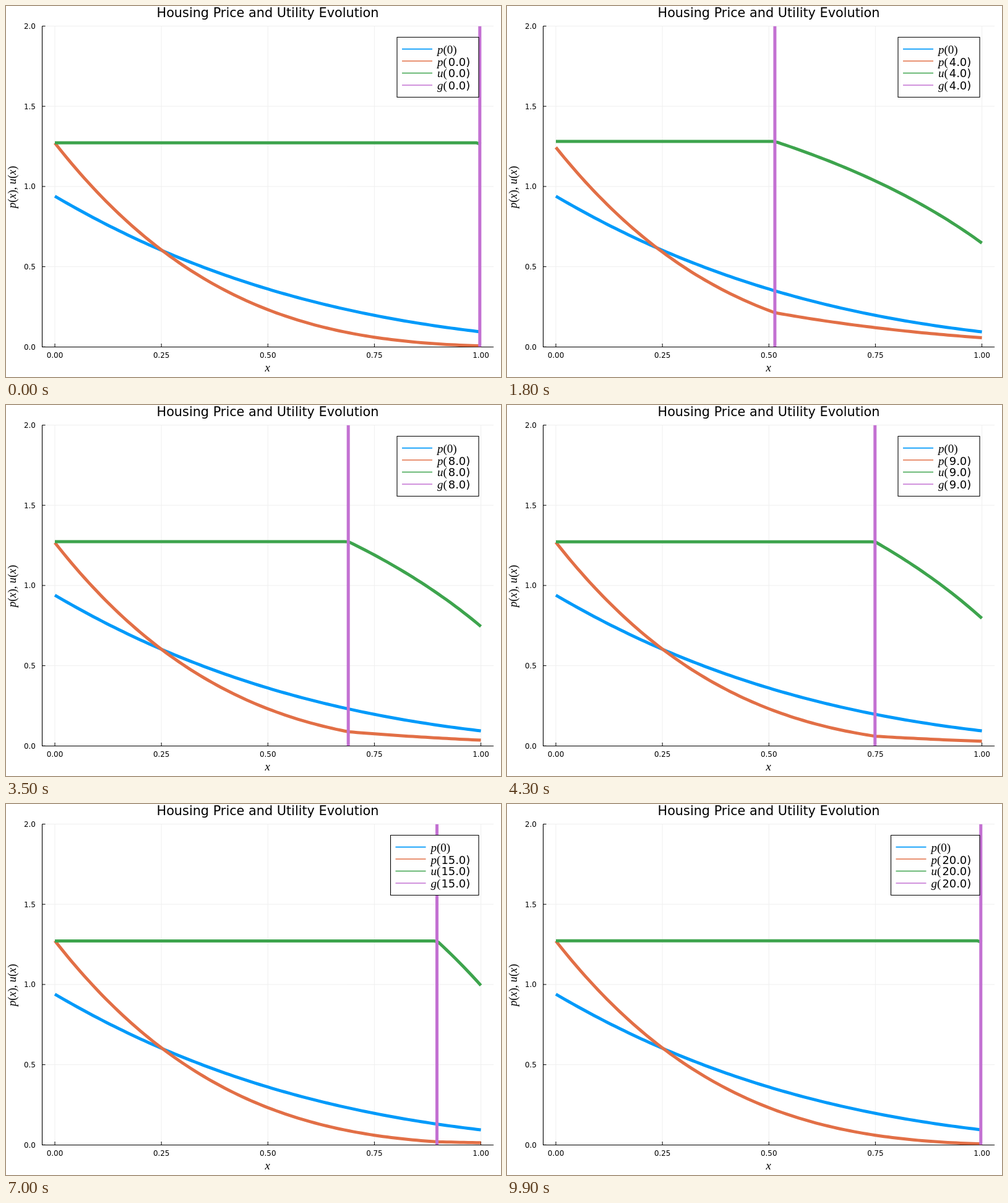
An HTML page with a canvas for the animation above (10 s loop, 800x600 px).

```html
<!DOCTYPE html>
<html lang="en">
<head>
<meta charset="utf-8">
<title>Housing Price and Utility Evolution</title>
<style>
  html, body { margin: 0; width: 100%; height: 100%; overflow: hidden; background: #fff; }
  canvas { display: block; }
</style>
</head>
<body>
<canvas id="stage" width="800" height="600"></canvas>
<script>
const ctx = document.getElementById("stage").getContext("2d");
const BLUE = "#009afa", ORANGE = "#e26f46", GREEN = "#3da44d", PURPLE = "#c371d2";
const SANS = '"DejaVu Sans", sans-serif', SERIF = '"Liberation Serif", serif';
const LEFT = 58.5, RIGHT = 788, TOP = 32.5, BOTTOM = 551.3;
const FRAMES = 100, STEP_MS = 100;

const toX = x => 79 + 688.5 * x;
const toY = y => BOTTOM - 259.4 * y;

// Price curves are powers of linear functions of the distance x.
const POWER = 10 / 3;
const income = x => 1.0749 - 0.8593 * x;
const base = x => 0.9815 - 0.49 * x;

function line(points, color, width) {
  ctx.beginPath();
  points.forEach(([x, y]) => ctx.lineTo(x, y));
  ctx.strokeStyle = color;
  ctx.lineWidth = width;
  ctx.stroke();
}

function curve(f, color) {
  const points = Array.from({ length: 101 }, (_, i) => [toX(i / 100), toY(f(i / 100))]);
  line(points, color, 5);
}

function text(str, x, y, size, align) {
  ctx.font = `${size}px ${SANS}`;
  ctx.textAlign = align;
  ctx.fillText(str, x, y);
}

// Letters in italics, everything else upright.
function math(str, x, y, size) {
  ctx.textAlign = "left";
  for (const ch of str) {
    ctx.font = `${/[a-z]/.test(ch) ? "italic " : ""}${size}px ${SERIF}`;
    ctx.fillText(ch, x, y);
    x += ctx.measureText(ch).width;
  }
}

function drawAxes() {
  const xs = [0, 0.25, 0.5, 0.75, 1], ys = [0, 0.5, 1, 1.5, 2];
  for (const x of xs) line([[toX(x), TOP], [toX(x), BOTTOM]], "#efefef", 1);
  for (const y of ys) line([[LEFT, toY(y)], [RIGHT, toY(y)]], "#efefef", 1);
  line([[LEFT, TOP], [LEFT, 551.5], [RIGHT, 551.5]], "#000", 1.1);
  ctx.fillStyle = "#000";
  for (const x of xs) {
    line([[toX(x), 551], [toX(x), 546]], "#000", 1);
    text(x.toFixed(2), toX(x), 568.7, 11.9, "center");
  }
  for (const y of ys) {
    line([[LEFT, toY(y)], [LEFT + 5, toY(y)]], "#000", 1);
    text(y.toFixed(1), 47.8, toY(y) + 4.4, 11.9, "right");
  }
  text("Housing Price and Utility Evolution", 423, 18.2, 20.8, "center");
  math("x", 418.5, 591, 18.5);
  ctx.save();
  ctx.translate(15.5, 327);
  ctx.rotate(-Math.PI / 2);
  math("p(x), u(x)", 0, 0, 18.4);
  ctx.restore();
}

function drawLegend(time) {
  const left = time < 10 ? 632 : time < 20 ? 621.5 : 620.5;
  ctx.fillStyle = "#fff";
  ctx.fillRect(left, 50.5, 764 - left, 97);
  ctx.strokeStyle = "#000";
  ctx.lineWidth = 1.1;
  ctx.strokeRect(left, 50.5, 764 - left, 97);
  const rows = [["p(0)", BLUE, 77.3], ["p(", ORANGE, 96.5], ["u(", GREEN, 115.3], ["g(", PURPLE, 135]];
  rows.forEach(([label, color, y], i) => {
    const mid = 69.6 + 19.45 * i;
    line([[left + 8, mid], [left + 57, mid]], color, 1.6);
    ctx.fillStyle = "#000";
    math(label, left + 65, y, 19);
    if (i) text(time.toFixed(1) + ")", 750.2, y, 17.9, "right");
  });
}

function draw(index) {
  const k = index || FRAMES - 1; // the opening picture shows the final state
  const edge = Math.sqrt(k * (0.015965 - 7.396e-5 * k + 1.436e-7 * k * k));
  const decay = Math.exp(-0.00825 * k);
  const level = base(edge) * decay / income(edge);
  const root = x => x < edge ? level * income(x) : decay * base(x);

  ctx.fillStyle = "#fff";
  ctx.fillRect(0, 0, 800, 600);
  drawAxes();
  ctx.save();
  ctx.beginPath();
  ctx.rect(LEFT, TOP, RIGHT - LEFT, BOTTOM - TOP);
  ctx.clip();
  curve(x => base(x) ** POWER, BLUE);
  curve(x => root(x) ** POWER, ORANGE);
  curve(x => 1.272 * income(x) / root(x), GREEN);
  line([[toX(edge), TOP], [toX(edge), BOTTOM]], PURPLE, 5);
  ctx.restore();
  drawLegend(Math.ceil(index * 20 / (FRAMES - 1)));
}

ctx.lineJoin = "round";
const start = performance.now();
function tick() {
  draw(Math.floor((performance.now() - start) / STEP_MS) % FRAMES);
  requestAnimationFrame(tick);
}
tick();
</script>
</body>
</html>
```
